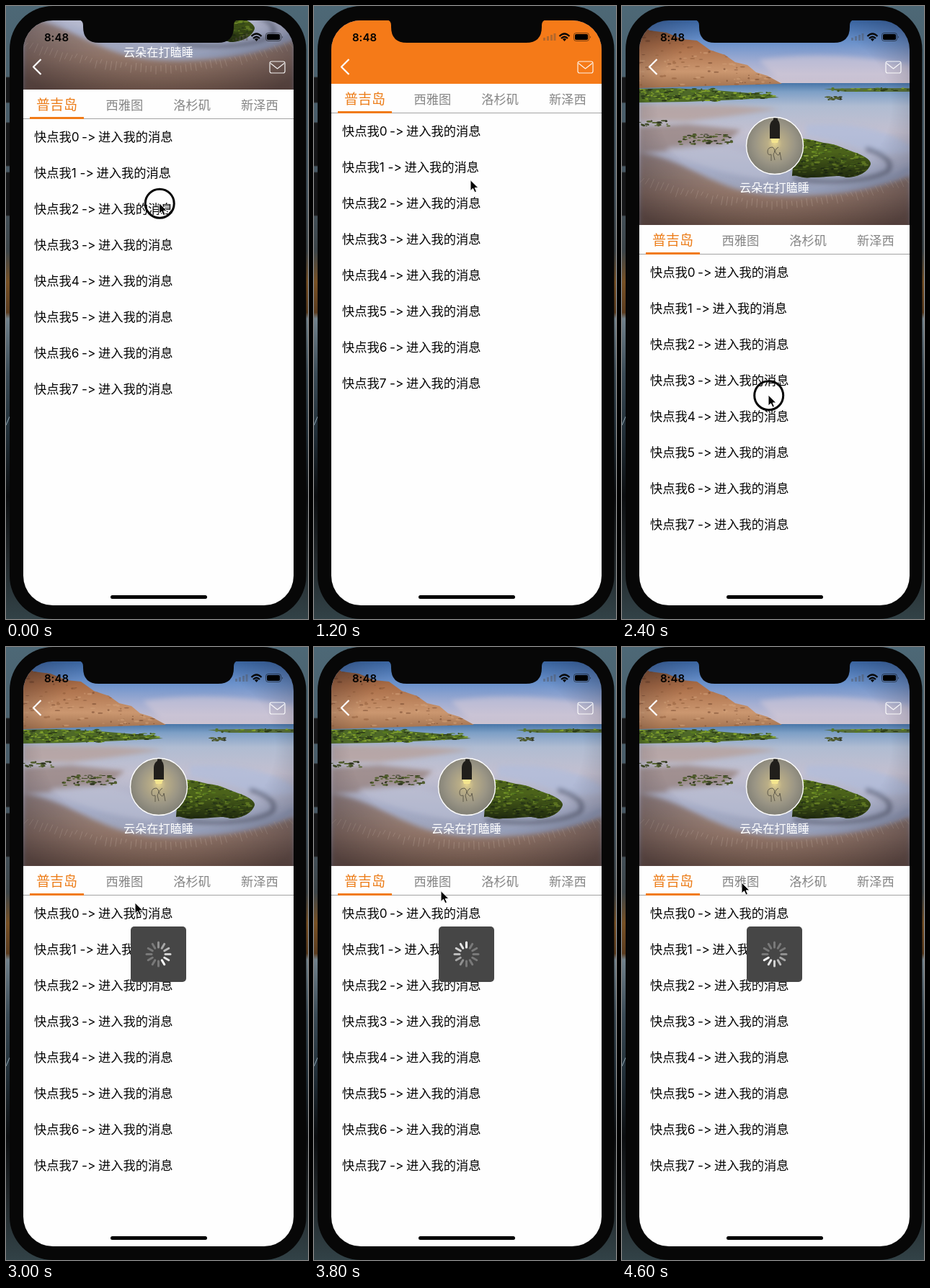
These frames come from a looping animation (419x851 px, 4800 ms). An HTML page:

```html
<!DOCTYPE html>
<html lang="zh-CN">
<head>
<meta charset="utf-8">
<title>个人主页</title>
<style>
  html, body { margin: 0; width: 100%; height: 100%; overflow: hidden; background: #060606; }
  svg { display: block; width: 419px; height: 851px; }
  text {
    font-family: Inter, "Noto Sans CJK SC", "Noto Sans CJK", sans-serif;
    font-variant-ligatures: none;
    font-feature-settings: "calt" 0;
  }
  .row { font-size: 17.25px; fill: #050505; }
  .tab { font-size: 17.25px; fill: #858585; text-anchor: middle; }
  .tab.on { font-size: 19px; fill: #ec7d19; }
  .name { font-size: 16.2px; fill: #fff; text-anchor: middle; }
  .clock { font-size: 15px; font-weight: 600; text-anchor: middle; }
  .line { fill: none; stroke: #fff; stroke-linejoin: round; }
</style>
</head>
<body>
<svg viewBox="0 0 419 851">
  <defs>
    <clipPath id="screen"><rect x="24" y="20" width="375" height="812" rx="41"/></clipPath>
    <clipPath id="rockClip"><path id="rock" d="M240 186C255 182 266 187 280 190C297 191 310 199 322 203C334 207 345 213 345 219C343 228 330 238 311 238C298 233 280 239 262 238C250 240 243 234 236 236Z"/></clipPath>
    <clipPath id="cliffClip"><path id="ridge" d="M24 22L38 34L62 37L84 46L104 48L122 61L143 68L157 78L174 82L186 92L202 97L222 108L24 114Z"/></clipPath>
    <clipPath id="face"><circle cx="212" cy="194" r="40"/></clipPath>
    <filter id="soft" x="-20%" y="-20%" width="140%" height="140%"><feGaussianBlur stdDeviation="3"/></filter>
    <linearGradient id="desk" x2="0" y2="1">
      <stop offset="0" stop-color="#4d6876"/><stop offset=".3" stop-color="#45545f"/>
      <stop offset=".4" stop-color="#3c4448"/><stop offset=".45" stop-color="#775024"/>
      <stop offset=".5" stop-color="#5b3c1f"/><stop offset=".51" stop-color="#71818b"/>
      <stop offset=".6" stop-color="#3a4a55"/><stop offset=".7" stop-color="#202d36"/>
      <stop offset=".8" stop-color="#0b0d0f"/><stop offset=".9" stop-color="#22282b"/>
      <stop offset="1" stop-color="#324247"/>
    </linearGradient>
    <linearGradient id="sky" x2="0" y2="1">
      <stop offset="0" stop-color="#3f6fb0"/><stop offset=".35" stop-color="#6c92cb"/>
      <stop offset=".65" stop-color="#a3aed2"/><stop offset="1" stop-color="#d3c6d1"/>
    </linearGradient>
    <linearGradient id="water" x2="0" y2="1">
      <stop offset="0" stop-color="#4875a8"/><stop offset=".06" stop-color="#7d9fc6"/>
      <stop offset=".16" stop-color="#b0bcd2"/><stop offset=".34" stop-color="#c3c0d0"/>
      <stop offset=".6" stop-color="#a5acc6"/><stop offset="1" stop-color="#8d8f9f"/>
    </linearGradient>
    <linearGradient id="sand" x2="0" y2="1">
      <stop offset="0" stop-color="#8f7f7f"/><stop offset=".5" stop-color="#94786b"/>
      <stop offset="1" stop-color="#785a49"/>
    </linearGradient>
    <linearGradient id="cliff" x2="0" y2="1">
      <stop offset="0" stop-color="#794d31"/><stop offset=".35" stop-color="#aa6d47"/>
      <stop offset=".75" stop-color="#cb9770"/><stop offset="1" stop-color="#a0704d"/>
    </linearGradient>
    <linearGradient id="shade" x2="0" y2="1">
      <stop offset=".35" stop-color="#10160a" stop-opacity="0"/>
      <stop offset="1" stop-color="#10160a" stop-opacity=".75"/>
    </linearGradient>
    <radialGradient id="vignette" cy=".42" r=".72">
      <stop offset=".6" stop-color="#100c18" stop-opacity="0"/>
      <stop offset="1" stop-color="#100c18" stop-opacity=".42"/>
    </radialGradient>
    <radialGradient id="glow" cy=".46">
      <stop offset="0" stop-color="#e6d58e"/><stop offset=".25" stop-color="#b9ad87"/>
      <stop offset=".7" stop-color="#9a9585"/><stop offset="1" stop-color="#858378"/>
    </radialGradient>
  </defs>

  <rect width="419" height="851" fill="url(#desk)"/>
  <path d="M0 582L5 570" stroke="#8fa6b4"/>
  <g fill="#151618" stroke="#2b2d2f">
    <rect x="-3" y="99" width="9" height="35"/><rect x="-3" y="162" width="9" height="60"/>
    <rect x="-3" y="231" width="9" height="60"/>
  </g>
  <rect x="5" y="0" width="411.500" height="851" rx="60" fill="#070707"/>

  <g clip-path="url(#screen)">
    <g id="hero">
      <rect x="24" y="20" width="375" height="90" fill="url(#sky)"/>
      <path d="M190 75Q290 60 400 82V100H215Z" fill="#d8ccd8" opacity=".5" filter="url(#soft)"/>
      <rect x="24" y="107" width="375" height="200" fill="url(#water)"/>
      <use href="#ridge" fill="url(#cliff)"/>
      <g id="strata" clip-path="url(#cliffClip)" opacity=".5"></g>
      <g filter="url(#soft)">
        <path d="M24 136L150 138L218 143L150 153L90 160L24 160Z" fill="#b79f99" opacity=".75"/>
        <path d="M24 168L90 164L165 172L140 192L80 200L24 204Z" fill="#8f776f" opacity=".65"/>
        <path d="M60 198Q130 186 175 205T200 240Q120 232 60 198Z" fill="#bcc0d4" opacity=".6"/>
        <path d="M255 165Q340 160 385 185T350 205Q300 185 255 180Z" fill="#afbcdc" opacity=".7"/>
        <path d="M24 204C70 209 106 236 155 253S310 270 400 236V320H24Z" fill="url(#sand)"/>
        <path d="M238 240C290 247 345 244 369 229C379 214 356 203 338 198" fill="none" stroke="#4d5468" stroke-width="6" opacity=".65"/>
        <path d="M235 252C300 258 350 254 399 226" fill="none" stroke="#8797b8" stroke-width="5" opacity=".6"/>
      </g>
      <path d="M24 115L70 114L130 117L190 122L218 127L160 130L90 133L24 134Z" fill="#4e6927"/>
      <path d="M280 115L330 114H399V119H310Z" fill="#566d3b"/>
      <g id="grass"></g>
      <use href="#rock" fill="#4b621a"/>
      <g id="moss" clip-path="url(#rockClip)"></g>
      <use href="#rock" fill="url(#shade)"/>
      <g id="ripples" stroke="#c9b3a4" fill="none" opacity=".4"></g>
      <rect x="24" y="20" width="375" height="284" fill="url(#vignette)"/>
      <g clip-path="url(#face)">
        <circle cx="212" cy="194" r="40" fill="url(#glow)"/>
        <path d="M210 152h6v6q3 3 3 10v16h-14v-16q0-7 5-10z" fill="#211f1b"/>
        <path d="M206 184h12l-2 6h-8z" fill="#f5e58f"/>
        <path d="M209 196q-7 0-7 6t5 4v9m2-19q5 4 1 10l2 8m5-18q-7 4-3 9t5-2l2 11" fill="none" stroke="#5f5a4b"/>
      </g>
      <circle cx="212" cy="194" r="39.500" class="line" stroke-width="1.400"/>
      <text class="name" x="211.500" y="257.500">云朵在打瞌睡</text>
    </g>
    <rect id="bar" x="24" y="20" width="375" height="88" fill="#f57a18"/>
    <g id="sheet">
      <rect x="24" y="0" width="375" height="840" fill="#fefefe"/>
      <rect x="24" y="40" width="375" height="1" fill="#a4a4a4"/>
      <rect x="33" y="38" width="75" height="3" fill="#f17b17"/>
    </g>
    <g id="rows"></g>
    <g id="status">
      <text class="clock" x="70" y="48.500">8:48</text>
      <path d="M318 44h3v4h-3zM323 42h3v6h-3zM328 40h3v8h-3zM332.500 38h3v10h-3z" fill="#504a48" opacity=".38"/>
      <g fill="none" stroke="#080808" stroke-width="2.300">
        <path d="M340.500 42Q347.500 35 354.500 42M343 45Q347.500 40.500 352 45"/>
      </g>
      <path d="M345 46Q347.500 44 350 46L347.500 49Z"/>
      <rect x="360.500" y="37.500" width="21" height="11" rx="3" fill="none" stroke="#000" opacity=".5"/>
      <rect x="362" y="39" width="18" height="8" rx="1.800"/>
      <path d="M383 41.500q2 1.500 0 3.500z" opacity=".5"/>
    </g>
    <path class="line" d="M48.500 74L38 84.500L48.500 95" stroke-width="2.200"/>
    <g class="line" stroke-width="1.200" opacity=".9">
      <rect x="366" y="77" width="21" height="16" rx="2.500"/><path d="M367 79.500L376.500 87L386 79.500"/>
    </g>
  </g>
  <path d="M101 19Q107 20 107 27V29Q107 51 129 51H294Q316 51 316 29V27Q316 20 322 19Z" fill="#070707"/>
  <rect x="145" y="818" width="134" height="5" rx="2.500"/>
  <g id="hud">
    <rect x="173" y="388" width="77" height="77" rx="5" fill="#464646"/>
    <g id="spokes" stroke="#fff" stroke-width="3" stroke-linecap="round" transform="translate(211.500 426.500)"></g>
  </g>
  <g id="pointer">
    <circle id="ring" cx=".7" cy=".7" r="20" fill="none" stroke="#050505" stroke-width="3"/>
    <path d="M0 0V15L3.500 11.800L6 17.200L8.500 16.100L6.200 10.900H11Z" fill="#050505" stroke="#fff" stroke-width="1" stroke-linejoin="round"/>
  </g>
</svg>
<script>
const STEP = 200, LOOP = 4800, PINNED = 108, FULL = 304;
const $ = id => document.getElementById(id);

function add(parent, tag, attrs, text) {
  const el = document.createElementNS("http://www.w3.org/2000/svg", tag);
  for (const key in attrs) el.setAttribute(key, attrs[key]);
  if (text) el.textContent = text;
  parent.append(el);
  return el;
}

let seed = 7;
const rand = () => (seed = seed * 16807 % 2147483647) / 2147483647;
const between = (a, b) => a + (b - a) * rand();

function scatter(id, count, [x0, x1], [y0, y1], colors) {
  for (let i = 0; i < count; i++) {
    add($(id), "ellipse", {
      cx: between(x0, x1).toFixed(1), cy: between(y0, y1).toFixed(1),
      rx: between(1, 4).toFixed(1), ry: between(.5, 1.5).toFixed(1),
      fill: colors[Math.floor(rand() * colors.length)]
    });
  }
}

const greens = ["#57791f", "#7c9d28", "#2c3c18", "#86a530", "#3b511d"];
const darks = ["#3f4a24", "#566330", "#2f3420"];
const earths = ["#6d4128", "#8c5936", "#d6a67e"];
scatter("strata", 150, [24, 215], [30, 110], earths);
scatter("moss", 300, [236, 345], [184, 236], greens);
scatter("grass", 170, [24, 135], [115, 132], greens);
scatter("grass", 70, [130, 210], [120, 129], greens);
scatter("grass", 30, [285, 399], [114, 118], greens);
scatter("grass", 16, [280, 304], [126, 130], darks);
scatter("grass", 26, [24, 65], [159, 167], darks);
scatter("grass", 60, [80, 152], [178, 192], darks);

// Fringed waterline across the sand
for (let i = 0; i < 56; i++) {
  const u = i / 55, x = 24 + 375 * u;
  const y = 236 + 34 * Math.sin(Math.PI * u) + between(-2, 2);
  add($("ripples"), "path", { d: `M${x} ${y}l${(u - .5) * 12} ${between(5, 13)}` });
}

["普吉岛", "西雅图", "洛杉矶", "新泽西"].forEach((label, i) =>
  add($("sheet"), "text", {
    class: i ? "tab" : "tab on", x: 70.5 + 93.8 * i, y: i ? 27.5 : 28
  }, label));

for (let i = 0; i < 8; i++) {
  const row = add($("rows"), "text", { class: "row", y: 50 * i + 6.3 });
  const shift = i === 1 ? -2.5 : 0;
  add(row, "tspan", { x: 39 }, "快点我" + i);
  add(row, "tspan", { x: 105 + shift }, "->");
  add(row, "tspan", { x: 128 + shift }, "进入我的消息");
}

const spokes = Array.from({ length: 12 }, (_, i) =>
  add($("spokes"), "path", { d: "M0-9.500V-16.500", transform: `rotate(${30 * i})` }));

// Each track is a list of [step, value] pairs
const tracks = {
  list: [[0, 182], [1, 169], [2, 163], [3, 164], [4, 170], [5, 173], [6, 174], [7, 174],
    [8, 196], [9, 272], [10, 349], [11, 364], [12, 370]],
  x: [[0, 212.5], [2, 212.5], [3, 213], [6, 217], [7, 214], [10, 208.5], [12, 203], [15, 179], [19, 176], [23, 166]],
  y: [[0, 273.5], [2, 267], [3, 264], [6, 241.5], [7, 372], [8, 394], [9, 470], [10, 544.5],
    [11, 562], [12, 540], [13, 470], [14, 395], [15, 355], [19, 338.5], [23, 327]],
  spin: [[13, 1], [15, 5], [19, 12], [23, 20]]
};

function at(track, step) {
  const next = track.findIndex(([s]) => s >= step);
  if (next < 0) return track[track.length - 1][1];
  if (next === 0) return track[0][1];
  const [s0, v0] = track[next - 1], [s1, v1] = track[next];
  return v0 + (v1 - v0) * (step - s0) / (s1 - s0);
}

const move = (id, x, y) => $(id).setAttribute("transform", `translate(${x} ${y})`);
const show = (id, on) => $(id).setAttribute("visibility", on ? "visible" : "hidden");

function draw(step) {
  const list = at(tracks.list, step);
  const bottom = Math.max(PINNED, list - 66);
  move("hero", 0, bottom - FULL);
  move("sheet", 0, bottom);
  move("rows", 0, list);
  show("bar", bottom === PINNED);
  move("pointer", at(tracks.x, step), at(tracks.y, step));
  show("ring", step <= 3 || step >= 7 && step <= 12);
  show("hud", step >= 13);
  const head = Math.round(at(tracks.spin, step));
  spokes.forEach((spoke, i) => {
    const age = (head - i + 24) % 12;
    spoke.setAttribute("stroke-opacity", Math.max(.28, 1 - age * .12));
  });
}

const start = performance.now();
let shown = -1;
function tick() {
  const step = Math.floor((performance.now() - start) % LOOP / STEP);
  if (step !== shown) draw(shown = step);
  requestAnimationFrame(tick);
}
tick();
</script>
</body>
</html>
```
